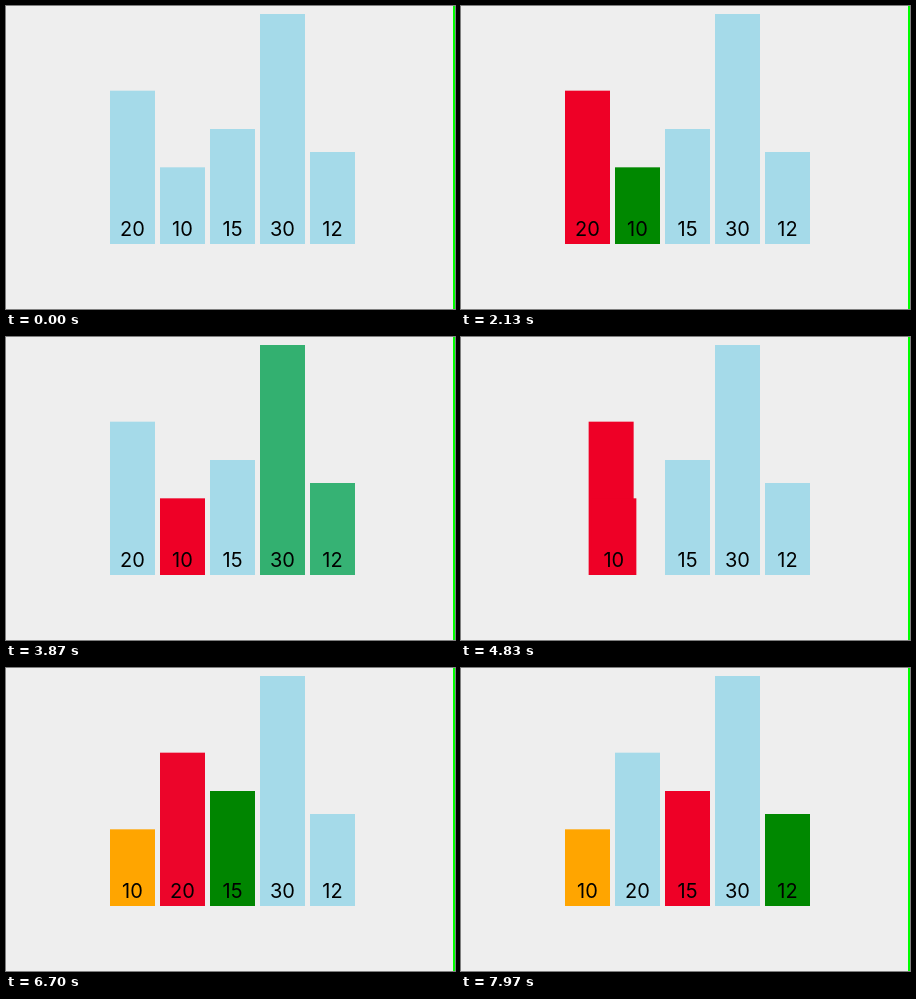
An HTML page with a canvas for the animation above (8000 ms loop, 449 by 303 pixels).

```html
<!DOCTYPE html>
<html lang="en">
<head>
<meta charset="utf-8">
<title>Selection sort</title>
<style>
  html, body { margin: 0; width: 100%; height: 100%; overflow: hidden; background: #eee; }
  canvas { display: block; }
</style>
</head>
<body>
<canvas id="stage" width="449" height="303"></canvas>
<script>
const ctx = document.getElementById('stage').getContext('2d');
const LOOP = 8000;
const BAR_WIDTH = 45, BAR_STEP = 50, LEFT = 104, BASE = 238, UNIT = 230 / 30;

// The green lies outside the displayable range, so its mixes clamp at zero red.
const BLUE = [165, 218, 233], RED = [238, 0, 38], GREEN = [-60, 136, -5], ORANGE = [255, 165, 0];

// Start and length of every step of the sort, in ms.
const STEPS = {
  pickFirst: [1345, 300], test10: [1810, 300], min10: [2300, 300],
  test15: [2805, 300], test30: [3309, 300], test12: [3813, 200],
  mark: [4215, 300], swap: [4747, 300], sorted: [5215, 300],
  pickSecond: [5700, 300], retest15: [6185, 300], min15: [6690, 300],
  retest30: [7140, 300], retest12: [7560, 270]
};

// Each bar lists the colours it fades to and, if it moves, its slot after the swap.
const bars = [
  { value: 20, slot: 0, swapTo: 1, fades: [['pickFirst', RED], ['min10', BLUE], ['mark', RED],
    ['sorted', BLUE], ['pickSecond', RED], ['min15', BLUE]] },
  { value: 10, slot: 1, swapTo: 0, fades: [['test10', GREEN], ['min10', RED], ['sorted', ORANGE]] },
  { value: 15, slot: 2, fades: [['test15', GREEN], ['test30', BLUE], ['retest15', GREEN], ['min15', RED]] },
  { value: 30, slot: 3, fades: [['test30', GREEN], ['test12', BLUE], ['retest30', GREEN], ['retest12', BLUE]] },
  { value: 12, slot: 4, fades: [['test12', GREEN], ['mark', BLUE], ['retest12', GREEN]] }
];

const mix = (a, b, p) => a + (b - a) * p;
const bezier = (a, b, u) => 3 * a * u * (1 - u) ** 2 + 3 * b * u * u * (1 - u) + u ** 3;

// The CSS "ease" curve, cubic-bezier(.25, .1, .25, 1).
function ease(x) {
  if (x <= 0 || x >= 1) return x <= 0 ? 0 : 1;
  let low = 0, high = 1;
  for (let i = 0; i < 20; i++) {
    const mid = (low + high) / 2;
    if (bezier(.25, .25, mid) < x) low = mid; else high = mid;
  }
  return bezier(.1, 1, low);
}

function progress(step, time) {
  const [start, length] = STEPS[step];
  return ease((time - start) / length);
}

function colourAt(bar, time) {
  const rgb = bar.fades.reduce((from, [step, to]) => {
    const p = progress(step, time);
    return from.map((channel, i) => mix(channel, to[i], p));
  }, BLUE);
  return `rgb(${rgb.map(c => Math.max(0, Math.round(c))).join(',')})`;
}

function drawBar(bar, time) {
  const slot = mix(bar.slot, bar.swapTo ?? bar.slot, progress('swap', time));
  const x = LEFT + slot * BAR_STEP;
  const height = bar.value * UNIT;
  ctx.fillStyle = colourAt(bar, time);
  ctx.fillRect(x, BASE - height, BAR_WIDTH, height);
  ctx.fillStyle = '#000';
  ctx.fillText(bar.value, x + BAR_WIDTH / 2, 230);
}

function draw(now) {
  const time = now % LOOP;
  ctx.fillStyle = '#eee';
  ctx.fillRect(0, 0, 449, 303);
  ctx.fillStyle = '#0f0';
  ctx.fillRect(447, 0, 2, 303);
  ctx.font = '20px Inter, sans-serif';
  ctx.textAlign = 'center';
  bars.forEach(bar => drawBar(bar, time));
}

const origin = performance.now();
function tick() {
  draw(performance.now() - origin);
  requestAnimationFrame(tick);
}
tick();
</script>
</body>
</html>
```
